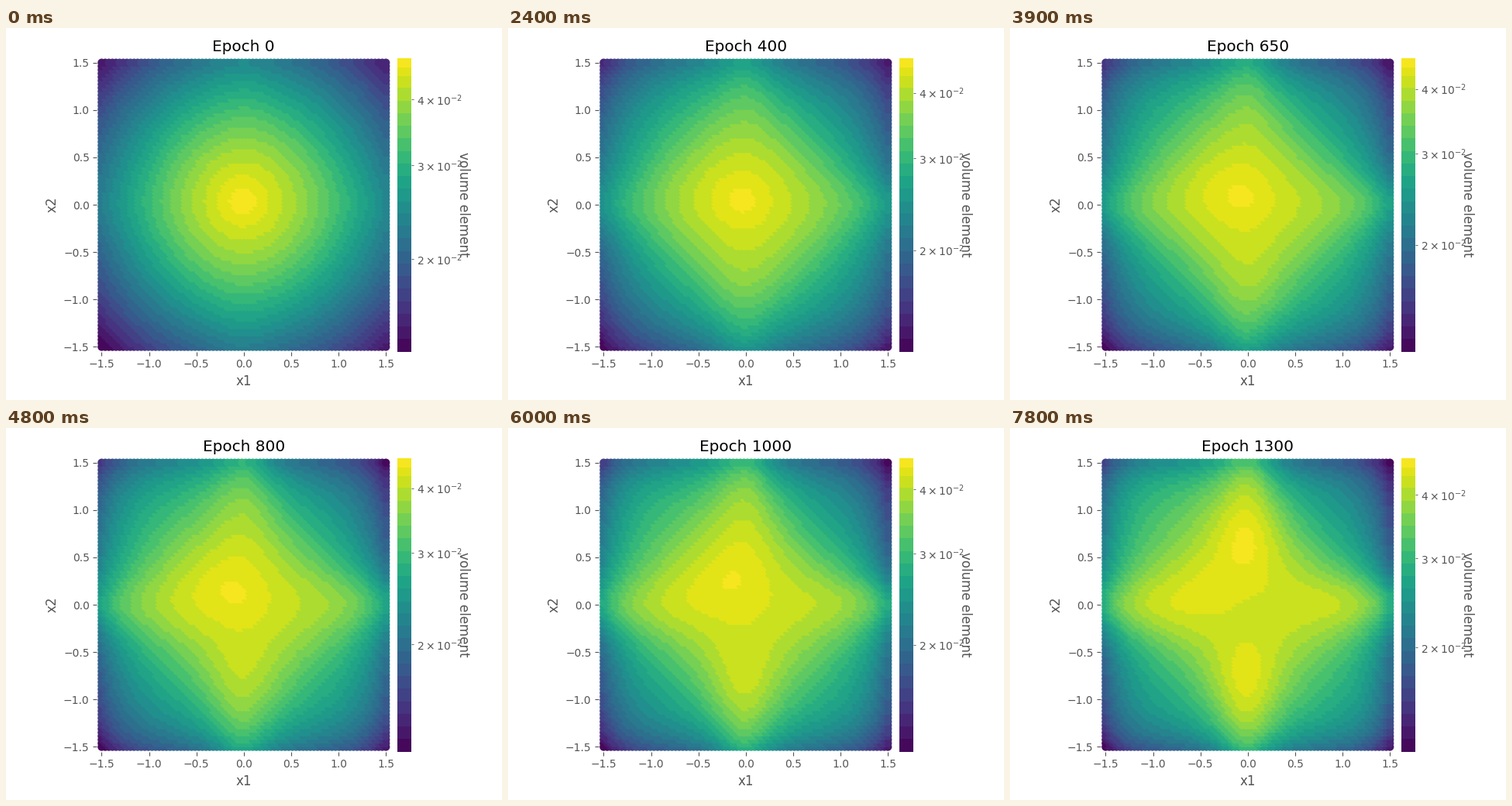
A matplotlib script for the animation above (8000 ms loop, 640 by 480 pixels).

```python
import numpy as np
import matplotlib.pyplot as plt
from matplotlib.animation import FuncAnimation

WIDTH, HEIGHT, DPI = 640, 480, 100
GRAY = "#555555"
CENTER_X, CENTER_Y, HALF = 306.8, 228.1, 189.5
LIMIT, POINTS = 1.55, 80
FRAMES, INTERVAL, HOLD = 80, 100, 3
EPOCH_STEP, LAST_EPOCH = 50, 1300

# Colour bands are finer at the bright end.
EDGES = np.r_[np.linspace(0, .9, 22), .94, .97, 1]
BAND_COLORS = plt.get_cmap("viridis")((EDGES[:-1] + EDGES[1:]) / 2)


def bump(x, y, cx, cy, width):
    return np.exp(-((x - cx) ** 2 + (y - cy) ** 2) / (2 * width ** 2))


def corner_loss(x, y):
    """Saturating drop towards the four corners, zero on both axes."""
    depth = np.where(y > 0, np.where(x > 0, .44, .25),
                     np.where(x > 0, .34, .40))
    q = (x * y) ** 2
    return depth * q / (q + .25)


def early_surface(x, y):
    """A soft cone, slightly steeper on the left."""
    r = np.hypot(x, y - .03) + 1e-9
    slope = .31 * (1 - .05 * x / r)
    return .99 - slope * r ** 1.4 - .15 * corner_loss(x, y)


def late_surface(x, y):
    """A cross-shaped plateau with a left and a bottom swelling."""
    plateau = .925 - .025 * x ** 6 - .020 * y ** 6 - corner_loss(x, y)
    return (plateau + .03 * bump(x, y, -.6, .16, .3)
            + .04 * bump(x, y, 0, -.8, .27))


def surface(x, y, epoch):
    s = epoch / LAST_EPOCH
    mix = s * (1.35 - .35 * s)
    peak = .055 * s * bump(x, y, -.6 * s * (1 - s) - .02,
                           .05 + .62 * s ** 2, .35)
    return (1 - mix) * early_surface(x, y) + mix * late_surface(x, y) + peak


def band_colors(values):
    band = np.searchsorted(EDGES, values, side="right") - 1
    return BAND_COLORS[np.clip(band, 0, len(BAND_COLORS) - 1)]


def pixel_axes(left, width):
    ax = fig.add_axes([left / WIDTH, 1 - bottom / HEIGHT,
                       width / WIDTH, 2 * HALF / HEIGHT])
    ax.spines[:].set_visible(False)
    ax.tick_params(colors=GRAY, labelsize=10)
    return ax


plt.rcParams["font.family"] = "DejaVu Sans"
fig = plt.figure(figsize=(WIDTH / DPI, HEIGHT / DPI), dpi=DPI,
                 facecolor="white")
top, bottom = CENTER_Y - HALF, CENTER_Y + HALF

ax = pixel_axes(CENTER_X - HALF, 2 * HALF)
ticks = np.arange(-1.5, 1.6, .5)
ax.set(xticks=ticks, yticks=ticks, xlim=(-LIMIT, LIMIT), ylim=(-LIMIT, LIMIT))
ax.set_xlabel("x1", fontsize=12, color=GRAY)
ax.set_ylabel("x2", fontsize=12, color=GRAY)
title = ax.set_title("", fontsize=14.4, color="black", pad=6.3)

side = np.linspace(-1.5, 1.5, POINTS)
grid_x, grid_y = (c.ravel() for c in np.meshgrid(side, side))
dots = ax.scatter(grid_x, grid_y, s=56, linewidths=0)

cax = pixel_axes(505, 17.5)
bar = band_colors(np.linspace(0, 1, 380))[:, None]
cax.imshow(bar, extent=(0, 1, bottom, top), origin="lower", aspect="auto",
           interpolation="nearest")
cax.set(xlim=(0, 1), ylim=(bottom, top), xticks=[])
cax.yaxis.tick_right()
cax.tick_params(axis="y", length=2, width=.6, pad=3.4)
fig.text(590 / WIDTH, 1 - CENTER_Y / HEIGHT, "volume element", rotation=270,
         fontsize=12, color=GRAY, ha="center", va="center")
TICK_LABELS = [r"$\mathdefault{%d\times10^{-2}}$" % n for n in (4, 3, 2)]


def update(frame):
    epoch = frame // HOLD * EPOCH_STEP
    title.set_text(f"Epoch {epoch}")
    # Each row of dots covers the one below, so sample slightly lower.
    dots.set_facecolor(band_colors(surface(grid_x, grid_y - .03, epoch)))
    # The logarithmic scale drifts as the value range changes.
    keys = [0, 650, 900, LAST_EPOCH]
    four = np.interp(epoch, keys, [92, 78.5, 77, 86])
    two = np.interp(epoch, keys, [298, 279.5, 278.5, 283])
    three = four + (two - four) * np.log2(4 / 3)
    cax.set_yticks([four, three, two], TICK_LABELS)
    return dots, title


anim = FuncAnimation(fig, update, frames=FRAMES, interval=INTERVAL,
                     repeat=True, repeat_delay=0, blit=False)
plt.show()
```
